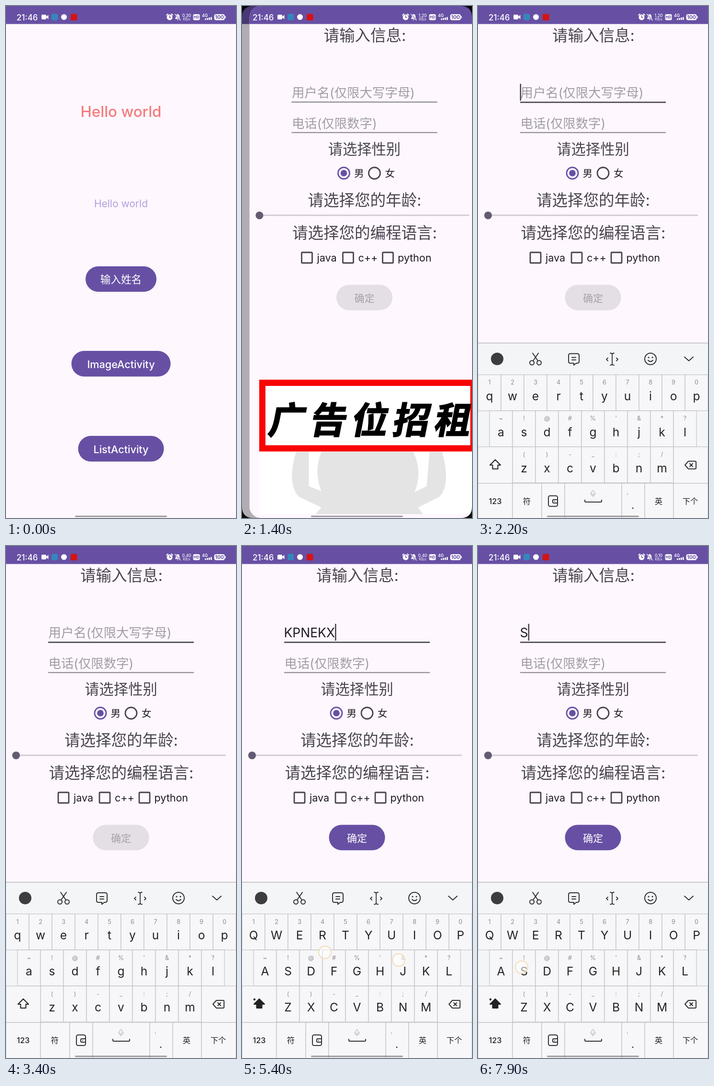
Write an HTML page that moves like this. It is 480 px wide and 1066 px high and loops after 8 s.

```html
<!DOCTYPE html>
<html lang="zh">
<head>
<meta charset="utf-8">
<title>Form demo</title>
<style>
html, body { margin: 0; width: 100%; height: 100%; overflow: hidden; background: #fef7ff; }
svg { display: block; width: 100%; height: 100%; }
text { font-family: Inter, "Noto Sans CJK SC", "Noto Sans CJK", sans-serif; white-space: pre; }
</style>
</head>
<body>
<svg id="stage" viewBox="0 0 480 1066" xmlns="http://www.w3.org/2000/svg"></svg>
<script>
const LOOP = 8000, STEP = 100;
const PURPLE = '#6750a4', PAGE = '#fef7fe', INK = '#1d1b20', SOFT = '#49454f', HINT = '#a19da4';
const NAME = 'KPNEKX';

// Markup helpers
const text = (x, y, size, str, fill = INK, more = '') =>
  `<text x="${x}" y="${y}" font-size="${size}" fill="${fill}" ${more}>${str}</text>`;
const mid = (x, y, size, str, fill, more = '') =>
  text(x, y, size, str, fill, 'text-anchor="middle" ' + more);
const rect = (x, y, w, h, fill, more = '') =>
  `<rect x="${x}" y="${y}" width="${w}" height="${h}" fill="${fill}" ${more}/>`;
const circle = (x, y, r, fill, more = '') =>
  `<circle cx="${x}" cy="${y}" r="${r}" fill="${fill}" ${more}/>`;
const line = (d, stroke = '#333', w = 2, more = '') =>
  `<path d="${d}" fill="none" stroke="${stroke}" stroke-width="${w}" stroke-linecap="round" stroke-linejoin="round" ${more}/>`;
const pill = (x, y, w, h, label, base) =>
  rect(x, y, w, h, PURPLE, `rx="${h / 2}"`) + mid(x + w / 2, base, 21.6, label, '#fff', 'font-weight="500"');

const background = () => rect(0, 0, 480, 1066, PAGE) + rect(0, 0, 480, 37.5, PURPLE);

function homePage() {
  return background() +
    mid(240, 230.5, 31.3, 'Hello world', '#f47c7c', 'font-weight="500"') +
    mid(240, 419, 21, 'Hello world', '#b3a0dc') +
    pill(166, 542, 148, 53, '输入姓名', 577) +
    pill(136.5, 718, 207, 53.5, 'ImageActivity', 754) +
    pill(150.5, 895, 179, 53.5, 'ListActivity', 931) +
    rect(166, 542, 148, 53, '#fff', 'id="ripple" rx="26.5"');
}

function banner() {
  const figure = 'M98 928C84 970 86 1005 104 1022L150 1044L138 1058H362L352 1044L396 1022' +
    'C414 1005 414 970 402 928H376L370 1000L345 1012Q362 970 342 928H150Q134 970 150 1010L124 1000V928Z';
  const sign = [...'广告位招租'].map((c, i) =>
    mid(0, 0, 76, c, '#000', `font-weight="900" stroke="#000" stroke-width="2" transform="translate(${75 + 86.5 * i} 890) skewX(-11)"`)).join('');
  return rect(20.5, 778, 453.5, 280, '#fff') +
    `<path d="${figure}" fill="#e4e4e4"/>` +
    rect(27, 784.5, 440.5, 136.5, '#fff', 'stroke="#f80404" stroke-width="13"') + sign;
}

function formPage() {
  const box = x => rect(x - 11, 513, 22, 22, 'none', `stroke="${SOFT}" stroke-width="2.8" rx="1.5"`);
  return background() +
    mid(241, 73, 32.5, '请输入信息:', SOFT) +
    text(88.5, 190, 26.4, '用户名(仅限大写字母)', HINT, 'id="hint"') +
    text(87.5, 190, 26.5, '', INK, 'id="name"') +
    rect(88, 162, 2.6, 35, SOFT, 'id="caret"') +
    rect(88, 199, 304, 2, '#858188', 'id="underline"') +
    text(88.5, 253.5, 26.4, '电话(仅限数字)', HINT) +
    rect(88, 262.5, 304, 2, '#858188') +
    mid(240, 308.5, 30.3, '请选择性别', SOFT) +
    circle(197, 348, 12, 'none', `stroke="${PURPLE}" stroke-width="2.8"`) + circle(197, 348, 6.8, PURPLE) +
    circle(261, 348, 12, 'none', `stroke="${SOFT}" stroke-width="2.8"`) +
    text(218.5, 356, 20.5, '男') + text(283, 356, 20.5, '女') +
    mid(240.5, 415.5, 32.5, '请选择您的年龄:', SOFT) +
    rect(21, 434.3, 438, 3, '#d2ccd5', 'rx="1.5"') + circle(21, 436, 8, '#625b71') +
    mid(240.5, 483.5, 32.5, '请选择您的编程语言:', SOFT) +
    box(120) + text(141, 532, 21.5, 'java') +
    box(206) + text(227, 532, 21.5, 'c++') +
    box(289) + text(309.5, 532, 21.5, 'python') +
    rect(181.5, 580.5, 117, 53, '#e3dfe4', 'id="okBox" rx="26.5"') +
    mid(240, 615.5, 21, '确定', '#a5a1a8', 'id="okText" font-weight="500"') +
    banner();
}

// Keyboard in its own coordinates, top edge at 0
function keyboard() {
  const rows = [
    ['qwertyuiop', '1234567890', 0, 66],
    ['asdfghjkl', "~!@#%'&*?", 24, 141],
    ['zxcvbnm', '()-_:;/', 72, 216]
  ];
  const key = (x, y, w, h, more = '') => rect(x, y, w, h, '#f7f7f9', 'stroke="#b9b9bf" stroke-width="1" ' + more);
  let s = rect(0, 0, 480, 368, '#f4f5f7') + rect(0, -1, 480, 2, '#cbc7cd');

  s += circle(40, 33, 13, '#3d3d40');
  s += circle(112.5, 41, 4.5, 'none', 'stroke="#333" stroke-width="2"') +
    circle(127.5, 41, 4.5, 'none', 'stroke="#333" stroke-width="2"') + line('M114 21L125 37M126 21L115 37');
  s += line('M193 22H207Q211 22 211 26V38Q211 42 207 42H205L200 46V42H193Q189 42 189 38V26Q189 22 193 22ZM196 30H204M196 35H204');
  s += line('M276 21Q280 21 280 24V43Q280 46 276 46M284 21Q280 21 280 24M280 43Q280 46 284 46M271 31L268 34L271 37M289 31L292 34L289 37', '#333', 1.8);
  s += circle(360, 33, 12, 'none', 'stroke="#333" stroke-width="2"') + circle(356, 30, 1.6, '#333') +
    circle(364, 30, 1.6, '#333') + line('M355 36Q360 41 365 36');
  s += line('M431 29L440 37L449 29');

  for (const [letters, marks, left, top] of rows) {
    [...letters].forEach((c, i) => {
      const x = left + 48 * i;
      s += key(x, top, 48, 75) +
        mid(x + 24, top + 20.5, 12.5, marks[i].replace('&', '&amp;'), '#8b8b90') +
        mid(x + 24, top + 53, 24.5, c, '#222', 'class="letter"');
    });
  }
  s += key(0, 216, 72, 76) + key(408, 216, 72, 76, 'id="backKey"');
  s += `<path id="shift" d="M36 243L25 254H30.5V262H41.5V254H47Z" stroke="#222" stroke-width="2" stroke-linejoin="round"/>` +
    circle(26, 244, 2.2, '#222', 'id="lock"');
  s += line('M439 246H453Q455 246 455 248V260Q455 262 453 262H439L432 254ZM442 251L448 257M448 251L442 257');

  const edges = [0, 72, 133, 181, 300, 348, 408, 480];
  for (let i = 0; i < 7; i++) s += key(edges[i], 292, edges[i + 1] - edges[i], 76);
  const label = (x, str) => mid(x, 335, 16.3, str, '#222', 'font-weight="500"');
  s += label(36, '123') + label(102, '符') + label(377, '英') + label(443, '下个');
  s += rect(147, 318, 19, 22, 'none', 'rx="3.5" stroke="#333" stroke-width="2"') +
    line('M166 326H158Q156 326 156 328V331Q156 333 158 333H166') + circle(160, 329.5, 1, '#333');
  s += line('M223 327V329Q223 331 225 331H256Q258 331 258 329V327');
  s += rect(237.5, 307, 5, 9, 'none', 'rx="2.5" stroke="#aaa"') + line('M235 312Q235 318 240 318Q245 318 245 312M240 318V320', '#aaa', 1);
  s += mid(312, 314, 12, ',', '#8b8b90') + mid(323, 345, 20, '.', '#222', 'font-weight="500"');
  return s;
}

function statusBar() {
  const bars = [0, 1, 2, 3].map(i => rect(415 + 4 * i, 26 - i, 2.6, 3 + i, '#fff')).join('');
  return text(22, 29.5, 17, '21:46', '#fff', 'font-weight="500"') +
    rect(74, 18, 10, 10, '#fff', 'rx="2"') + '<path d="M84 22L88.5 18.5V27.5L84 24Z" fill="#fff"/>' +
    rect(95, 16.5, 13, 13, '#3587bd', 'rx="2"') + circle(121, 23, 6, '#fff') +
    rect(135, 16.5, 13.5, 13.5, '#d51313', 'rx="2"') +
    circle(341.5, 23.5, 6, '#fff') + line('M341.5 20V24H344', PURPLE, 1.4) + line('M335 19L338 16.5M348 19L345 16.5', '#fff', 1.8) +
    '<path d="M352.5 27Q354.5 25 354.5 21Q355 17 358 17Q361.5 17 362 21Q362 25 364 27ZM356.5 28H360Q358.2 31 356.5 28Z" fill="#fff"/>' +
    line('M352.5 17L364 29.5', PURPLE, 2.6) + line('M352.5 17L364 29.5', '#fff', 1.2) +
    mid(377, 22.5, 8.5, '', '#fff', 'id="speed" font-weight="500"') + mid(377, 29.5, 7, 'KB/s', '#fff') +
    rect(390.5, 17, 14, 12.5, '#fff', 'rx="3"') + mid(397.5, 26.3, 8, 'HD', PURPLE, 'font-weight="700"') +
    text(409, 23, 8.5, '4G', '#fff', 'font-weight="600"') + bars +
    rect(434.5, 17, 22, 12.5, '#fff', 'rx="4"') + rect(457, 21, 1.6, 4.5, '#fff') +
    mid(445.5, 27.2, 10.5, '100', PURPLE, 'font-weight="700"');
}

// Rounded screen corners, seen while the pages slide
const corners = '<path id="bezel" d="M0 0H24Q0 0 0 24ZM480 0V24Q480 0 456 0ZM0 1066V1042Q0 1066 24 1066ZM480 1066H456Q480 1066 480 1042Z"/>';

const stage = document.getElementById('stage');
stage.innerHTML = `
  <defs><clipPath id="round"><rect id="corner" width="480" height="1066"/></clipPath></defs>
  <g id="home">${homePage()}</g>
  ${rect(0, 0, 480, 1066, '#000', 'id="dim"')}
  <g id="form"><g clip-path="url(#round)">${formPage()}</g></g>
  ${corners}
  <g id="keys">${keyboard()}</g>
  <g>${statusBar()}</g>
  ${rect(144, 1061, 192, 3.2, '#8d898f', 'rx="1.6" opacity=".8"')}
  <g id="touches"></g>`;

const el = {};
stage.querySelectorAll('[id]').forEach(n => el[n.id] = n);
const letters = [...stage.querySelectorAll('.letter')];
const set = (n, attrs) => { for (const k in attrs) n.setAttribute(k, attrs[k]); };
const show = (n, on) => n.setAttribute('visibility', on ? 'visible' : 'hidden');

// Distance left for a critically damped spring released at `start`
function remaining(t, start) {
  const k = Math.max(0, t - start) * 0.0187;
  return (1 + k) * Math.exp(-k);
}

const typedAt = i => Math.ceil((4800 + 120 * i) / STEP) * STEP;
// Touch markers: from, until, x, y
const taps = [
  [800, 1000, 240, 571], [1700, 1900, 210, 184],
  [4000, 4200, 36, 968], [4200, 4400, 36, 970],
  [6600, 7500, 443, 955], [7800, 8000, 91, 877],
  ...[...NAME].map((_, i) => [typedAt(i), typedAt(i) + 200, ...(i % 2 ? [173, 846] : [327, 862])])
];

function entered(t) {
  if (t >= 7800) return 'S';
  if (t >= 6900) return NAME.slice(0, Math.max(0, 5 - Math.floor((t - 6900) / STEP)));
  return [...NAME].filter((_, i) => t >= typedAt(i)).join('');
}

function caretOn(t) {
  if (t < 1900) return false;
  if (t >= 6900 || (t >= 4800 && t < 5400)) return true;
  return Math.floor((t - (t < 4800 ? 1900 : 5400)) / 500) % 2 === 0;
}

function draw(time) {
  const t = Math.floor(time / STEP) * STEP;

  const left = remaining(t, 1118), p = 1 - left;
  const shade = Math.pow(p, 1.8), sliding = left * 480 > 0.8;
  set(el.home, { transform: `translate(${-60 * p} 0)` });
  set(el.dim, { opacity: 0.32 * shade });
  set(el.form, { transform: `translate(${480 * left} 0)` });
  set(el.corner, { rx: sliding ? 24 : 0 });
  set(el.bezel, { opacity: sliding ? shade : 0 });
  show(el.form, p > 0);
  set(el.ripple, { opacity: t >= 800 && t < 1400 ? 0.1 : 0 });

  set(el.keys, { transform: `translate(0 ${700 + 366 * remaining(t, 1800)})` });
  show(el.keys, t > 1800);
  const upper = t >= 4000;
  letters.forEach(n => {
    n.textContent = upper ? n.textContent.toUpperCase() : n.textContent.toLowerCase();
  });
  set(el.shift, { fill: upper ? '#222' : 'none' });
  show(el.lock, t >= 4200);
  set(el.backKey, { fill: t >= 6600 && t < 7500 ? '#dedfe3' : '#f7f7f9' });

  const value = entered(t), focus = t >= 1800;
  el.name.textContent = value;
  show(el.hint, !value && p > 0);
  set(el.caret, { x: 87.5 + (value ? el.name.getComputedTextLength() : 0) });
  show(el.caret, caretOn(t));
  set(el.underline, { height: focus ? 3 : 2, fill: focus ? '#5f5a66' : '#858188' });
  set(el.okBox, { fill: value ? PURPLE : '#e3dfe4' });
  set(el.okText, { fill: value ? '#fff' : '#a5a1a8' });

  el.speed.textContent = t < 300 ? '0.30' : t < 3000 ? '1.20' : t < 7200 ? '0.40' : '0.10';
  el.touches.innerHTML = taps.filter(([a, b]) => t >= a && t < b).map(([, , x, y]) =>
    circle(x, y, 13, 'rgba(255,255,255,.55)', 'stroke="#f3dcb4" stroke-width="2"')).join('');
}

const begin = performance.now();
function tick() {
  draw((performance.now() - begin) % LOOP);
  requestAnimationFrame(tick);
}
tick();
</script>
</body>
</html>
```
